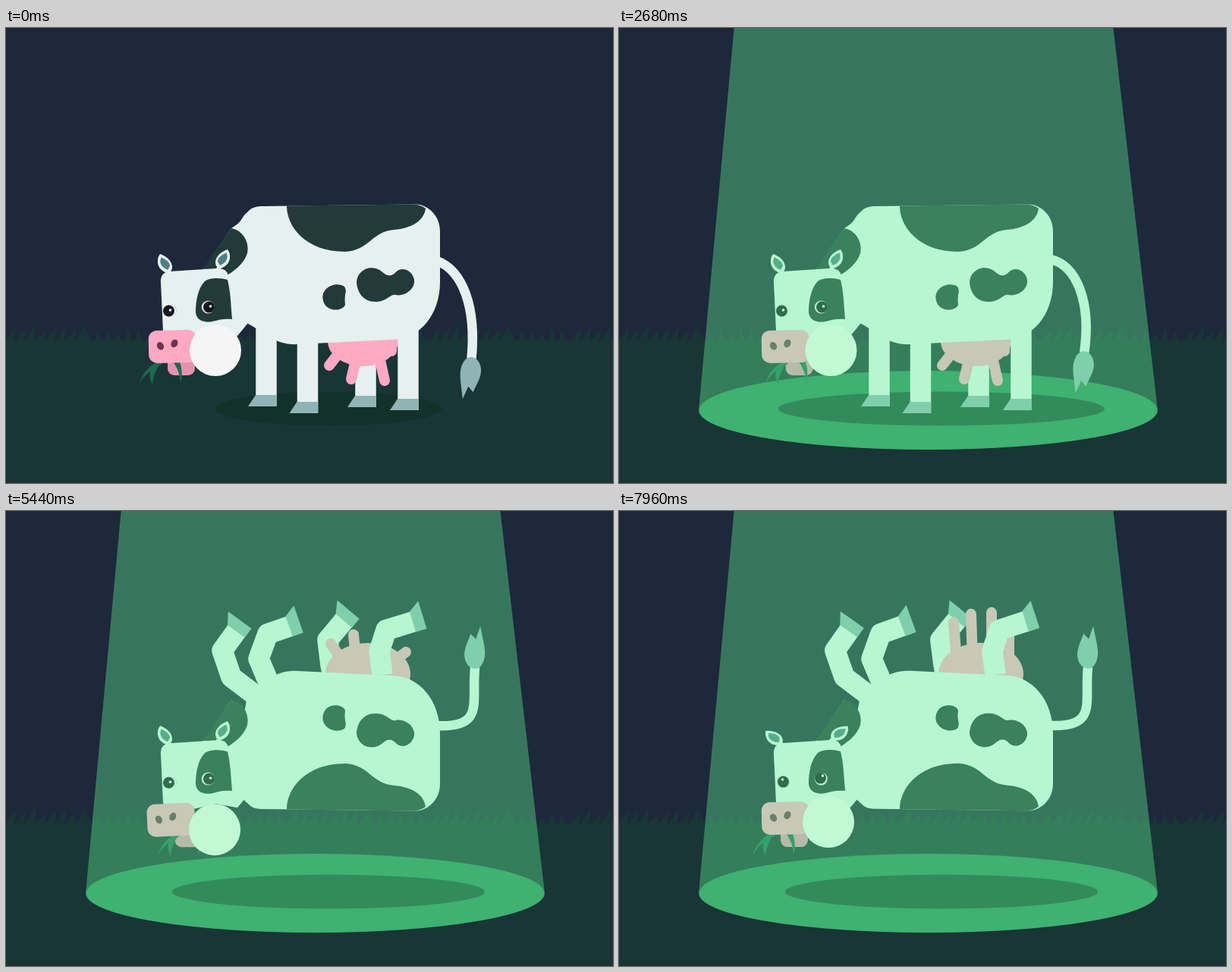
An HTML page with a canvas for the animation above (8000 ms loop, 800 by 600 pixels).

```html
<!DOCTYPE html>
<html lang="en">
<head>
<meta charset="utf-8">
<title>Cow in a beam</title>
<style>
html, body { margin: 0; width: 100%; height: 100%; overflow: hidden; background: #1d283b; }
canvas { display: block; }
</style>
</head>
<body>
<canvas id="stage" width="800" height="600"></canvas>
<script>
const LOOP = 8000;
const SKY = '#1d283b', GRASS = '#193536', BLADE = '#1d6a4f';
const WHITE = '#e6f0ef', DARK = '#233a3a', HOOF = '#90b4b5', PINK = '#ffa9c4';
const GLOW = 'rgba(100,255,155,.36)', DISC = '#2a8459';
const BODY_MID = 325.5;
const c = document.getElementById('stage').getContext('2d');

const clamp = x => Math.max(0, Math.min(1, x));
const mix = (a, b, k) => a + (b - a) * k;
const mixAll = (a, b, k) => a.map((v, i) => mix(v, b[i], k));
const span = (t, from, to) => clamp((t - from) / (to - from));
const smooth = (t, from, to) => { const k = span(t, from, to); return k * k * (3 - 2 * k); };
const wave = (t, period, start = 0) => (1 - Math.cos(2 * Math.PI * (t - start) / period)) / 2;
const backOut = (k, s) => 1 + (s + 1) * (k - 1) ** 3 + s * (k - 1) ** 2;

function fill(color, path) {
  c.fillStyle = color;
  c.fill(typeof path === 'string' ? new Path2D(path) : path);
}
function oval(color, x, y, rx, ry = rx, turn = 0) {
  const p = new Path2D();
  p.ellipse(x, y, rx, ry, turn, 0, 7);
  fill(color, p);
}
function box(color, x, y, w, h, r) {
  const p = new Path2D();
  p.roundRect(x, y, w, h, r);
  fill(color, p);
}
function at(x, y, turn, paint) {
  c.save();
  c.translate(x, y);
  c.rotate(turn);
  paint();
  c.restore();
}
function stroke(color, width, path, cap = 'butt') {
  c.strokeStyle = color;
  c.lineWidth = width;
  c.lineCap = cap;
  c.lineJoin = 'round';
  c.stroke(path);
}

const SHAPES = {
  body: 'M297 264C313 255 309 250 318 243C324 236 330 235 340 235L540 232.500C557 233 572 248 572 268V335C572 378 545 411 508 411L385 417C355 419 341 401 319 390Z',
  spots: 'M370 234.500C370 262 395 295 447 295C478 294 482 268 512 266C535 264 551 254 553 238Q545 232 535 232.500ZM446 341Q449 345 447 352Q446 358 447 365C444 374 420 376 417.500 357C416 341 436 334 446 341ZM462 335C463 322 475 314 487 317C497 319 498 328 508 326C514 324 514 318 524 318C535 320 539 330 538 336C536 348 522 354 514 352C506 350 503 361 487 361C470 361 463 348 462 335Z',
  neck: 'M297 264L261 317L245 395L305 406L319 389L340 300Z',
  neckSpot: 'M260 317L297 264C312 267 321 282 318 297C314 311 300 321 288 328Z',
  head: 'M204 336Q203 322 216 321L278 317Q291 316 293 327L300 395L230 412L207 400Z',
  eyeSpot: 'M298 384L297 372C296 355 295 345 292 332C283 329 268 329 262 334C253 343 250 360 250 375C251 386 262 389 272 387C282 384 290 383 298 384Z',
  ear: 'M-2 -1C-10 -4 -15 -10 -14 -18C-14 -22 -12 -24 -11 -26C-2 -23 5 -16 5 -9C5 -6 4 -4 3 -3L5 2L1 3Z',
  earInner: 'M-1 -5C-8 -8 -11.500 -13 -10.500 -18L-9.500 -21.500C-3 -19 2 -15 2 -10Z',
  tuft: 'M0 -2C8 -2 14 7 14 16C14 27 8 36 6 44L-1 37L-7 54C-9 42 -14 25 -13 16C-12 7 -8 -2 0 -2Z',
  blades: 'M205 438C190 443 180 455 176 469C183 456 192 450 206 443ZM196 442C188 452 188 460 193 470C194 460 197 452 203 443ZM218 437C226 448 230 458 230 469C233 458 232 448 228 437Z'
};

// Joints from hip to ankle, standing and floating, in upright body space.
const straight = (x, ...ys) => ys.flatMap(y => [x, y]);
const LEGS = {
  farFront: [straight(343, 380, 420, 455, 485), [338, 378, 297, 409, 285, 444, 304, 470]],
  nearFront: [straight(397.5, 390, 425, 460, 494), [347, 400, 333, 433, 345, 466, 374, 476]],
  farHind: [straight(474, 400, 425, 455, 486), [432, 405, 428, 425, 424, 458, 446, 484]],
  nearHind: [straight(530, 385, 420, 455, 490), [496, 412, 492, 443, 501, 471, 537, 482]]
};
// Base and tip: standing, floating, stretched; then the time it stretches.
const TEATS = [
  [[440, 427, 426, 445], [437, 440, 428, 453], [445, 430, 441, 481], 5600],
  [[461, 438, 455, 463], [460, 445, 458, 465], [466, 430, 464, 492], 5850],
  [[493, 438, 499, 465], [495, 445, 498, 465], [491, 430, 491, 494], 6100],
  [[508, 422, 508, 426], [515, 433, 527, 442], [514, 425, 514, 462], 7150]
];
// Curve points of the tail, then the direction of its tuft in degrees.
const TAIL = {
  hang: [568, 307, 602, 320, 620, 368, 613.5, 436, 95],
  alarm: [568, 290, 605, 255, 642, 310, 611, 376, 93],
  float: [568, 283, 632, 286, 613, 252, 618, 206, -90]
};

function meadow() {
  const p = new Path2D('M0 600V412H800V600Z');
  for (let i = -1; i < 62; i++) {
    const x = i * 13.3, lean = Math.sin(i * 0.45) > -0.3 ? 12 : 1;
    const tip = 396 + 4 * Math.sin(i * 2.4) + 2 * Math.sin(i * 5.1);
    p.moveTo(x - 5, 416);
    p.quadraticCurveTo(x + lean * 0.3, 407, x + lean, tip);
    p.quadraticCurveTo(x + lean + 1, 406, x + 9, 416);
  }
  fill(GRASS, p);
}

function leg([stand, float], bend, kick) {
  const p = mixAll(stand, float, bend);
  const dx = p[6] - p[4], dy = p[7] - p[5];
  const turn = Math.atan2(dy, dx) - kick, reach = Math.hypot(dx, dy);
  p[4] += 10 * kick;
  p[5] += 6 * kick;
  p[6] = p[4] + reach * Math.cos(turn);
  p[7] = p[5] + reach * Math.sin(turn);
  const line = new Path2D();
  for (let i = 0; i < 8; i += 2) line.lineTo(p[i], p[i + 1]);
  stroke(WHITE, 27.5, line);
  at(p[6], p[7], turn - Math.PI / 2, () => fill(HOOF, 'M-14 -1H14V14H-24Z'));
}

function udder(t, bend) {
  oval(PINK, mix(470.5, 477, bend), 413, mix(46.5, 56, bend), mix(33, 41, bend));
  for (const [stand, float, long, start] of TEATS) {
    const [x, y, tx, ty] = mixAll(mixAll(stand, float, bend), long, smooth(t, start, start + 500));
    stroke(PINK, 14, new Path2D(`M${x} ${y}L${tx} ${ty}`), 'round');
  }
}

function tail(t, flip, lift) {
  const sway = t < 2500 ? wave(t, 1250) : flip * wave(t, 1250, 5490) * 0.65;
  const p = mixAll(mixAll(TAIL.hang, TAIL.alarm, smooth(t, 2500, 3300)), TAIL.float, flip);
  const swing = 12 * Math.sin(Math.PI * flip);
  p[4] += sway * 4 + swing;
  p[6] += sway * 16 + swing;
  p[7] -= sway * 4;
  const turn = p[8] + sway * (flip > 0.5 ? 8 : -14);
  c.save();
  c.translate(0, lift);
  stroke(WHITE, 12.5, new Path2D(`M${p[0]} ${p[1]}C${p.slice(2, 8)}`));
  at(p[6], p[7], (turn - 90) * Math.PI / 180, () => fill(HOOF, SHAPES.tuft));
  c.restore();
}

function ear(x, y, side, turn) {
  c.save();
  c.translate(x, y);
  c.scale(side, 1);
  c.rotate(turn);
  fill(WHITE, SHAPES.ear);
  fill('#507f80', SHAPES.earInner);
  c.restore();
}

function eye(x, y, look, white, ring) {
  oval('#f3c6cd', x + white, y, ring);
  oval(WHITE, x + white, y, ring - 0.8);
  oval('#10191f', x + 2 * look * Math.sign(white), y - look, 7.5);
  oval('#fff', x + 2 - look, y - 1 - 3 * look, 1.8);
}

function head(t) {
  const late = t > 3900;
  const chew = late ? wave(t, 1008, 7960) : wave(t, 776);
  const slide = chew * (late ? 24 : 17), drop = late ? chew * 10 : 0;
  const look = smooth(t, 7200, 7500), perk = look * 0.42;
  fill(WHITE, SHAPES.neck);
  fill(DARK, SHAPES.neckSpot);
  ear(214, 324, 1, -perk);
  ear(281, 318, -1, -perk);
  fill(WHITE, SHAPES.head);
  fill(DARK, SHAPES.eyeSpot);
  eye(214.5, 373, look, 2, 8.5);
  eye(267.5, 368, look, -1.2, 8.6);

  box('#e592b0', 213 + slide * 0.4, 430, 36, 28, 9);
  c.save();
  c.translate(slide, 0);
  fill(BLADE, SHAPES.blades);
  c.restore();
  at(219.5 - (late ? chew * 2 : 0), 420 + drop * 0.2, -0.02 - drop * 0.003, () => {
    box(PINK, -31.5, -21.5, 63, 43, 11);
    oval('#6b3650', -16, -1, 4.3, 5.5, -0.5);
    oval('#6b3650', 2.5, -4, 4.3, 5.5, 0.5);
  });
  oval('#f5f5f5', 276 + (late ? -chew : chew * 3.5), 425 + drop, 34);
}

function cow(t) {
  const flip = smooth(t, 4300, 4780), bend = smooth(t, 4480, 5040);
  const bob = Math.cos(2 * Math.PI * (t - 5900) / 2500);
  const leap = -32 * Math.sin(Math.PI * span(t, 4320, 5060));
  const raised = BODY_MID - 10 * smooth(t, 3350, 4200);
  const mid = mix(raised, 303.7 - 3 * bob, flip) + leap;
  const kick = bend * (0.4 - bob) * 20 * Math.PI / 180;

  tail(t, flip, flip * (mid - 302.5));
  c.save();
  c.translate(0, mid);
  c.scale(1, Math.cos(Math.PI * flip) || 0.001);
  c.translate(0, -BODY_MID);
  leg(LEGS.farFront, bend, kick);
  leg(LEGS.farHind, bend, kick);
  udder(t, bend);
  fill(WHITE, SHAPES.body);
  leg(LEGS.nearFront, bend, kick);
  leg(LEGS.nearHind, bend, kick);
  fill(DARK, SHAPES.spots);
  c.restore();

  c.save();
  c.translate(0, flip * (-14 - 2 * bob) + leap * 0.4);
  head(t);
  c.restore();
}

// Runs paint in the space of the beam as it shoots down from above the stage.
function inBeam(grow, paint) {
  if (grow <= 0) return;
  c.save();
  c.translate(406, -47);
  c.scale(Math.min(1, grow), grow);
  c.translate(-406, 47);
  paint();
  c.restore();
}

function draw(t) {
  const grow = t < 1744 ? 0 : backOut(span(t, 1744, 2500), 0.55);
  const lit = smooth(t, 1900, 2450);
  c.fillStyle = SKY;
  c.fillRect(0, 0, 800, 600);
  meadow();
  inBeam(grow, () => oval(DISC, 407.5, 504, 302, 52));
  const shade = mixAll([19, 48, 43], [24, 73, 54], lit).map(Math.round);
  oval(`rgb(${shade})`, 425, 502, mix(149, 215, lit) - 9 * smooth(t, 4250, 5000), 22.5);
  cow(t);
  inBeam(grow, () => fill(GLOW, 'M156 -47L105 504A302.500 52 0 0 0 710 504L646 -47Z'));
}

function frame(now) {
  draw(now % LOOP);
  requestAnimationFrame(frame);
}
draw(0);
requestAnimationFrame(frame);
</script>
</body>
</html>
```
